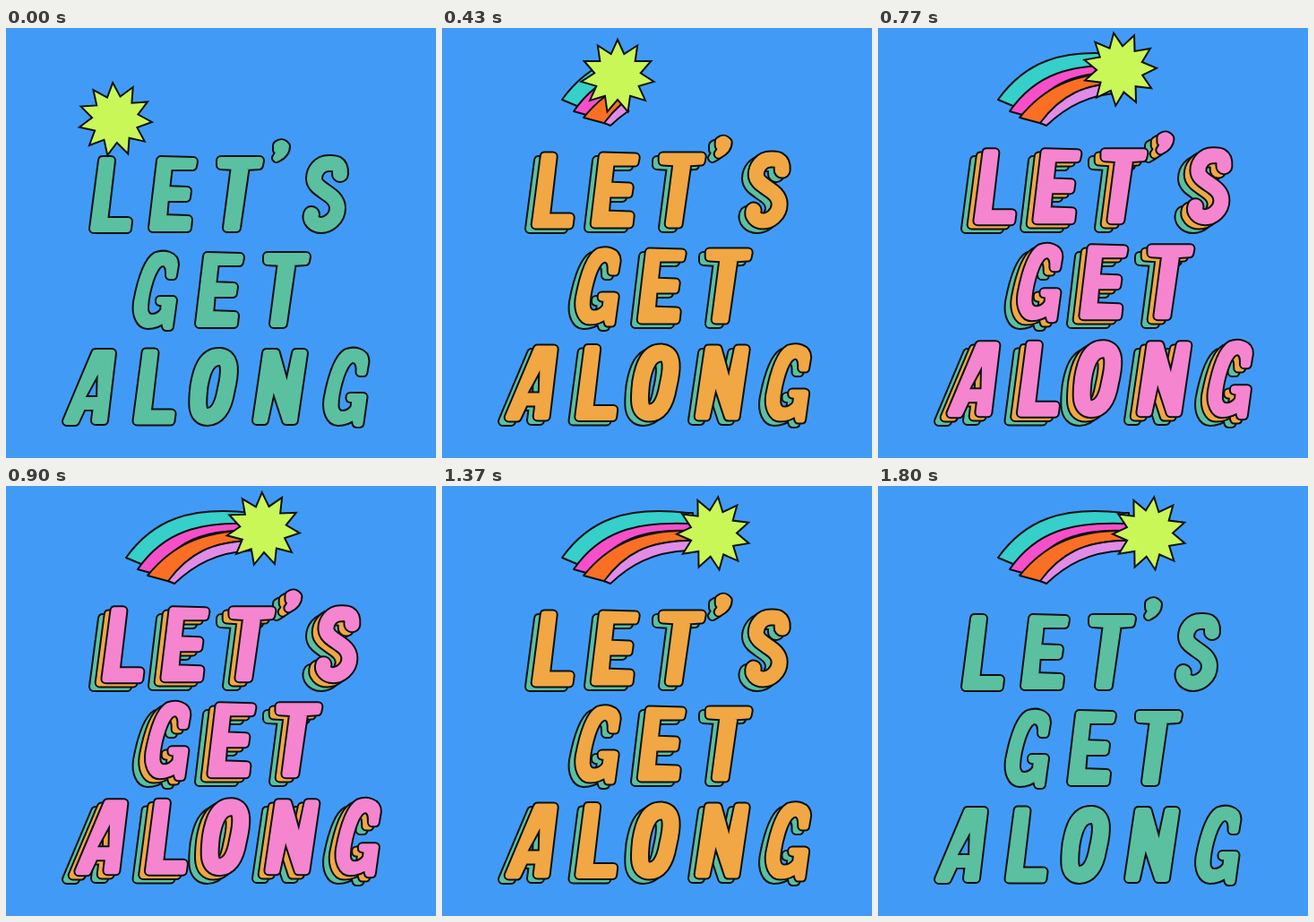
Write an HTML page with a canvas that moves like this. It is 480 by 480 pixels and loops after 1830 ms.

```html
<!DOCTYPE html>
<html lang="en">
<head>
<meta charset="utf-8">
<title>Let's get along</title>
<style>
  html, body { margin: 0; width: 100%; height: 100%; overflow: hidden; background: #419bf6; }
  canvas { display: block; width: 100vmin; height: 100vmin; }
</style>
</head>
<body>
<canvas width="480" height="480" role="img" aria-label="Let's get along"></canvas>
<script>
const ctx = document.querySelector('canvas').getContext('2d');
const LOOP = 1830, FPS = 30, LAST = 32;
const INK = '#0b1013', LIME = '#c9f758';
const LAYERS = ['#5bc0a0', '#f1a743', '#f585cf', LIME];

// Solid letters are cores swollen by 6px; round letters are thick strokes.
const solid = d => ({ path: new Path2D(d), fill: true, width: 12 });
const round = (d, width) => ({ path: new Path2D(d), fill: false, width });

const L = solid('M108 148L117 148 109 216 136 216 135 224 98 224Z');
const E = solid('M173 148L209 149 208 154 181 154 178 181 202 182 201 189 177 189 175 213 203 214 202 223 164 223Z');
const T = solid('M240 148L283 148 282 153 267 154 257 223 247 223 256 154 240 153Z');
const QUOTE = solid('M303 131Q308 127 312 132Q312 140 302 145Q307 139 303 136Z');
const S = round('M373 163C374 149 364 151 360 151C350 151 344 160 344 168C344 182 370 184 370 201C370 213 359 220 352 220C344 220 339 214 341 208', 20);
const G = solid('M183 276L186 276 188 264C188 254 176 252 168 255C156 262 150 290 147 306C145 320 150 331 158 331C166 331 172 328 177 324L179 333 182 333 186 304 172 304 172 305 178 306 177 316C170 326 155 328 154 314C154 300 160 275 168 265C174 258 184 260 183 276Z');
const A = solid('M100 363L118 363 109 438 100 438 102 422 85 422 77 439 68 439ZM107 370L82 416 106 416Z');
const O = round('M239 367C252 368 250 386 245.5 405C242 426 234 434 225 434C212 434 213.5 418 215.5 400C218.5 382 224 366 239 367Z', 22);
const N = solid('M291 363L301 363 314 410 324 363 332 363 321 438 313 438 298 392 288 438 280 438Z');

// letter, x shift, y shift
const WORDS = [
  [L, 0, 0], [E, 0, 0], [T, 0, 0], [QUOTE, 0, 0], [S, 0, 0],
  [G, 0, 0], [E, 52, 107], [T, 52, 107],
  [A, 0, 0], [L, 48.5, 214.5], [O, 0, 0], [N, 0, 0], [G, 212.5, 108]
];

const BANDS = [
  ['#37cfca', 'M134 80C164 38 205 22 274 30H280V44H274C215 40 180 52 153 88Z'],
  ['#f74fc9', 'M147 93C176 51 215 40 274 42H280V50H274C220 48 190 62 165 98Z'],
  ['#fb6f25', 'M158 100C184 68 218 49 274 50H280V61H274C230 62 205 75 184 107Z'],
  ['#e08ce6', 'M181 106C204 75 230 62 274 61H280V72H274C235 74 210 88 188 109Z']
].map(([color, d]) => [color, new Path2D(d)]);

// step, x, y, turn in degrees
const KEYS = [
  [0, 122, 102, -94], [5, 150, 81, -91], [13, 196, 54, -90], [23, 270, 46, -67], [LAST, 303, 53, -50]
];

function slope(i, c) {
  const a = KEYS[Math.max(i - 1, 0)], b = KEYS[Math.min(i + 1, KEYS.length - 1)];
  return (b[c] - a[c]) / (b[0] - a[0]);
}

// Cubic Hermite through the keys.
function pose(step) {
  const s = Math.min(step, LAST);
  let i = 0;
  while (i < KEYS.length - 2 && s > KEYS[i + 1][0]) i++;
  const a = KEYS[i], b = KEYS[i + 1], h = b[0] - a[0], u = (s - a[0]) / h, v = 1 - u;
  return [1, 2, 3].map(c =>
    a[c] * (1 + 2 * u) * v * v + b[c] * u * u * (3 - 2 * u) +
    h * u * v * (v * slope(i, c) - u * slope(i + 1, c)));
}

function paintLetter([letter, x, y], color, inset) {
  ctx.save();
  ctx.translate(x, y);
  ctx.fillStyle = ctx.strokeStyle = color;
  ctx.lineWidth = letter.width - 2 * inset;
  if (letter.fill) ctx.fill(letter.path, 'evenodd');
  ctx.stroke(letter.path);
  ctx.restore();
}

function drawWords(count) {
  for (let i = 0; i < count; i++) {
    ctx.save();
    ctx.translate(i * 6.7, i * -4.4);
    for (const w of WORDS) {
      paintLetter(w, INK, 0);
      paintLetter(w, LAYERS[i], 2);
    }
    ctx.restore();
  }
}

function outlined(path, color) {
  ctx.fillStyle = color;
  ctx.strokeStyle = INK;
  ctx.lineWidth = 2;
  ctx.fill(path);
  ctx.stroke(path);
}

// The trail shows only behind the star's direction of travel.
function drawTrail(step) {
  const s = Math.max(1, Math.min(step, LAST));
  const [x, y] = pose(step), [x1, y1] = pose(s), [x0, y0] = pose(s - 1);
  const behind = new Path2D(), half = new Path2D();
  half.rect(-400, -400, 400, 800);
  const m = new DOMMatrix().translate(x, y).rotate(Math.atan2(y1 - y0, x1 - x0) * 180 / Math.PI);
  behind.addPath(half, m);
  ctx.save();
  ctx.clip(behind);
  for (const [color, path] of BANDS) outlined(path, color);
  ctx.restore();
}

function drawStar(step) {
  const [x, y, turn] = pose(step), star = new Path2D();
  for (let i = 0; i < 22; i++) {
    const r = i % 2 ? 26 : 41, a = turn * Math.PI / 180 + i * Math.PI / 11;
    star.lineTo(x + r * Math.cos(a), y + r * Math.sin(a));
  }
  star.closePath();
  ctx.lineJoin = 'miter';
  outlined(star, LIME);
  ctx.lineJoin = 'round';
}

function layerCount(step) {
  if (step < LAST) return 1 + (step >= 13) + (step >= 23);
  return 4 - (step >= 36) - (step >= 41) - (step >= 45);
}

function draw(now) {
  const step = Math.floor((now % LOOP + 3.5) * FPS / 1000);
  ctx.fillStyle = '#419bf6';
  ctx.fillRect(0, 0, 480, 480);
  ctx.lineJoin = ctx.lineCap = 'round';
  drawTrail(step);
  drawWords(layerCount(step));
  drawStar(step);
}

const start = performance.now();
function tick() {
  draw(performance.now() - start);
  requestAnimationFrame(tick);
}
tick();
</script>
</body>
</html>
```
